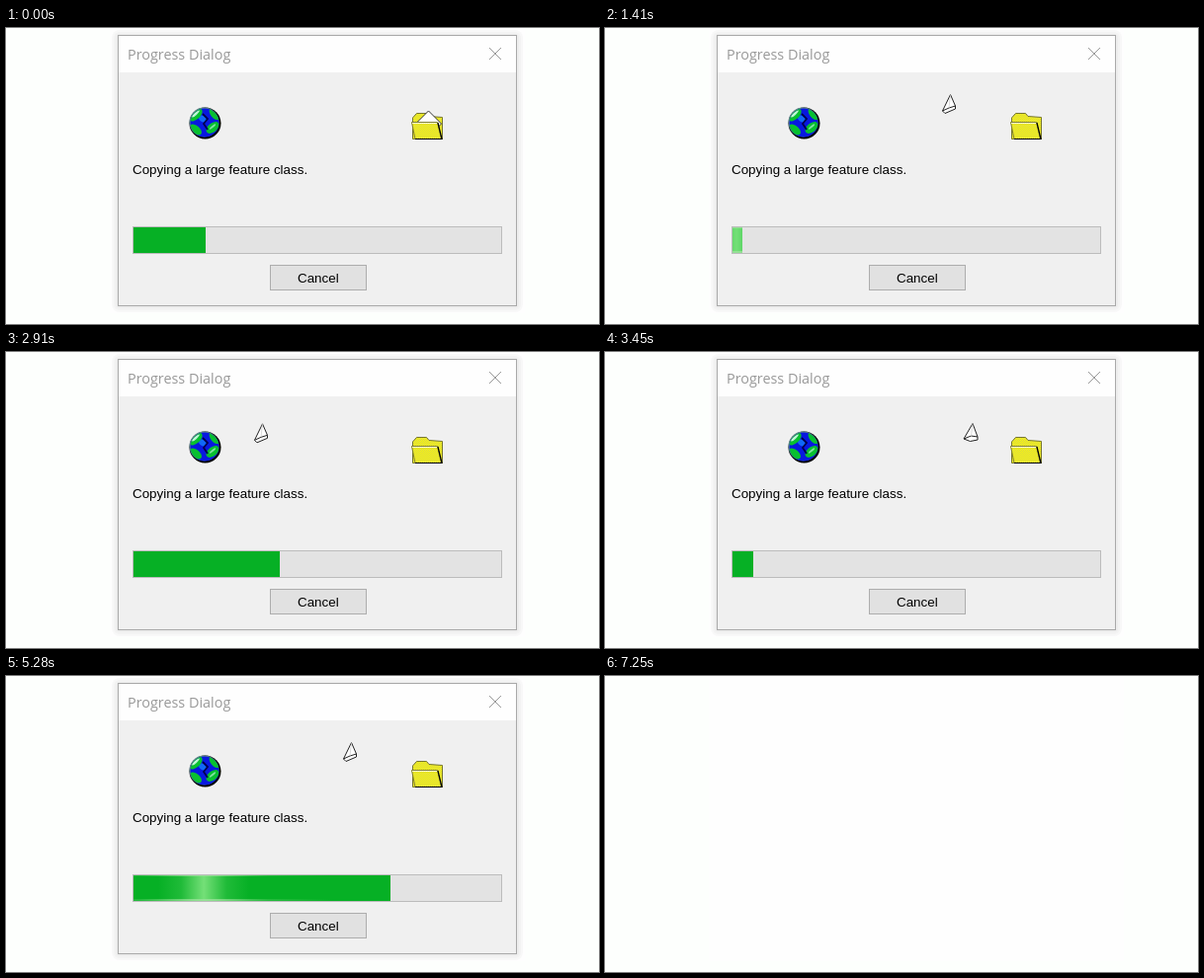
Write an HTML page with a canvas that moves like this. It is 600 px wide and 300 px high and loops after 7560 ms.

```html
<!DOCTYPE html>
<html lang="en">
<head>
<meta charset="utf-8">
<title>Progress Dialog</title>
<style>
html, body { margin: 0; width: 100%; height: 100%; overflow: hidden; background: #fdfffd; }
canvas { display: block; width: 600px; height: 300px; }
</style>
</head>
<body>
<canvas id="stage" width="600" height="300"></canvas>
<script>
const ctx = document.getElementById('stage').getContext('2d');
const LOOP = 7560, CLOSE = 6420;
const UI = '13.4px "Liberation Sans", Arial, sans-serif';
const LANDED = 10;

// Steps of the sheet in each flight: start, end, count, first pose.
const runs = [
  [0, 150, 2, 11],
  [430, 1410, 8, 0],
  [1550, 2090, 5, 8],
  [2370, 3300, 8, -1],
  [3450, 3990, 5, 8],
  [4420, 5420, 8, 1],
  [5580, 6000, 4, 9],
  [6270, CLOSE, 2, 0]
];

// Start time and filled width of the bar.
const levels = [[0, 73], [1410, 10], [1550, 148], [3450, 21], [3585, 260], [5420, 28]];

const last = (list, t) => list.filter(item => item[0] <= t).pop();

function stepAt(t) {
  const [from, to, count, first] = last(runs, t);
  const gap = (to - from) / (count - 1);
  const i = Math.min(count - 1, Math.floor((t - from) / gap + 0.01));
  return { time: from + i * gap, pose: first + i };
}

function fillRect(x, y, w, h, color) {
  ctx.fillStyle = color;
  ctx.fillRect(x, y, w, h);
}

function frame(x, y, w, h, fill, line) {
  fillRect(x, y, w, h, line);
  fillRect(x + 1, y + 1, w - 2, h - 2, fill);
}

function trace(points) {
  ctx.beginPath();
  points.forEach(([x, y]) => ctx.lineTo(x, y));
}

function line(points, color, width = 1) {
  trace(points);
  ctx.strokeStyle = color;
  ctx.lineWidth = width;
  ctx.stroke();
}

function shape(points, fill, edge) {
  trace(points);
  ctx.closePath();
  ctx.fillStyle = fill;
  ctx.fill();
  ctx.strokeStyle = edge;
  ctx.lineWidth = 1;
  ctx.stroke();
}

function oval(x, y, rx, ry, turn, color) {
  ctx.beginPath();
  ctx.ellipse(x, y, rx, ry, turn, 0, Math.PI * 2);
  ctx.fillStyle = color;
  ctx.fill();
}

function label(text, x, y, font, color) {
  ctx.font = font;
  ctx.fillStyle = color;
  ctx.fillText(text, x, y);
}

function checker(a, b) {
  const tile = document.createElement('canvas');
  tile.width = tile.height = 2;
  const c = tile.getContext('2d');
  c.fillStyle = a;
  c.fillRect(0, 0, 2, 2);
  c.fillStyle = b;
  c.fillRect(0, 0, 1, 1);
  c.fillRect(1, 1, 1, 1);
  return ctx.createPattern(tile, 'repeat');
}
const paper = checker('#ffff00', '#d2ce54');

function drawWindow() {
  ['#f8f8f8', '#f3f3f3', '#ededed'].forEach((color, i) => {
    const d = 6 - 2 * i;
    ctx.beginPath();
    ctx.roundRect(113 - d, 8 - d, 404 + 2 * d, 274 + 2 * d, d + 2);
    ctx.fillStyle = color;
    ctx.fill();
  });
  frame(113, 7, 404, 275, '#f0f0f0', '#a9a9a9');
  fillRect(114, 8, 402, 37, '#fefefe');
  label('Progress Dialog', 123, 32, '14.4px "Open Sans", "Noto Sans", sans-serif', '#999');
  line([[489, 20], [501, 32]], '#999');
  line([[501, 20], [489, 32]], '#999');
  label('Copying a large feature class.', 128, 148, UI, '#000');
  frame(267, 240, 98, 26, '#e1e1e1', '#adadad');
  label('Cancel', 295, 258, UI, '#000');
}

function drawGlobe() {
  ctx.save();
  ctx.translate(201, 96);
  oval(0.5, 0.5, 16, 16, 0, '#000');
  oval(-0.5, -0.5, 15, 15, 0, '#608888');
  ctx.beginPath();
  ctx.arc(0, 0, 14.5, 0, Math.PI * 2);
  ctx.clip();
  fillRect(-16, -16, 32, 32, '#0818e0');
  oval(-2, -4, 4, 3, 0.5, '#1068f8');
  const land = '#08c030';
  oval(-9, -8, 8, 4.5, -0.75, land);
  oval(10, -9, 7, 4, 0.9, land);
  oval(-9, 7, 7, 4, 0.7, land);
  oval(8, 5, 7.5, 4.5, -0.7, land);
  oval(-9, -9, 5, 1.2, -0.75, '#c0f4d8');
  oval(8, 4, 4, 1, -0.7, '#80e0a0');
  line([[-2, -9], [3, -4], [-1, 1], [3, 7]], '#000050', 1.8);
  ctx.restore();
}

function drawFolderBack() {
  shape([[411.5, 112.5], [411.5, 91], [415.5, 86.5], [425.5, 86.5], [428, 89.5], [441.5, 90.5], [441.5, 112.5]], paper, '#777730');
}

function drawFolderFront() {
  shape([[410.5, 95.5], [436.5, 95.5], [440.5, 112.5], [414, 112.5]], paper, '#808030');
  line([[411, 96.5], [436, 96.5]], '#ffffd0');
  line([[437, 96], [441, 112.5], [414, 112.5]], '#000', 1.2);
}

// The sheet sways as it flies along the arc, then stands on one corner in the folder.
function drawSheet(pose) {
  ctx.save();
  if (pose >= LANDED) {
    ctx.translate(427.5, pose === LANDED ? 92 : 97);
    shape([[0, -13], [13, 0], [0, 13], [-13, 0]], '#fff', '#333');
  } else {
    const k = pose - 7;
    const sway = Math.sin(k * Math.PI / 2);
    ctx.translate(348 + 22.5 * k, 77 + (k > 0 ? 5 * k : k * k / 3));
    const right = [6.5, 2 + 2 * sway];
    const low = [-4 + 3 * sway, 9.5 - sway];
    const left = [-6.5 - sway, 7 - sway];
    shape([[1.5, -9.5], right, [right[0], right[1] + 3], low, left], '#fff', '#222');
    line([right, [0, 4 - sway], left], '#222');
    line([[1.5, -9.5], [0, 4 - sway]], '#ccc', 0.7);
  }
  ctx.restore();
}

function glow(cx, reach, color, x, y, w, h) {
  const g = ctx.createLinearGradient(cx - reach, 0, cx + reach, 0);
  [0, 0.22, 0.95, 0.22, 0].forEach((alpha, i) =>
    g.addColorStop(i / 4, `rgba(${color},${alpha})`));
  fillRect(x, y, w, h, g);
}

function drawBar(time) {
  const x = 129, y = 202, h = 26;
  const w = last(levels, time)[1];
  frame(128, 201, 374, 28, '#e3e3e3', '#bcbcbc');
  fillRect(x, y, w, h, '#06b025');
  // A band of light crosses the bar every 950 ms.
  const shine = (time + 565) % 950 - 70;
  const cx = x - 1 + shine;
  glow(cx, 46, '122,226,124', x, y, w, h);
  glow(cx, 130, '150,225,150', x, y, w, 1);
  glow(cx, 130, '150,225,150', x, y + h - 2, w, 2);
}

function draw(t) {
  fillRect(0, 0, 600, 300, '#fdfffd');
  fillRect(105, 0, 420, 289, '#fefefe');
  if (t >= CLOSE) return;
  const { time, pose } = stepAt(t);
  drawWindow();
  drawBar(time);
  drawGlobe();
  drawFolderBack();
  if (pose >= LANDED) drawSheet(pose);
  drawFolderFront();
  if (pose > 0 && pose < LANDED) drawSheet(pose);
}

function tick() {
  draw(performance.now() % LOOP);
  requestAnimationFrame(tick);
}
tick();
</script>
</body>
</html>
```
